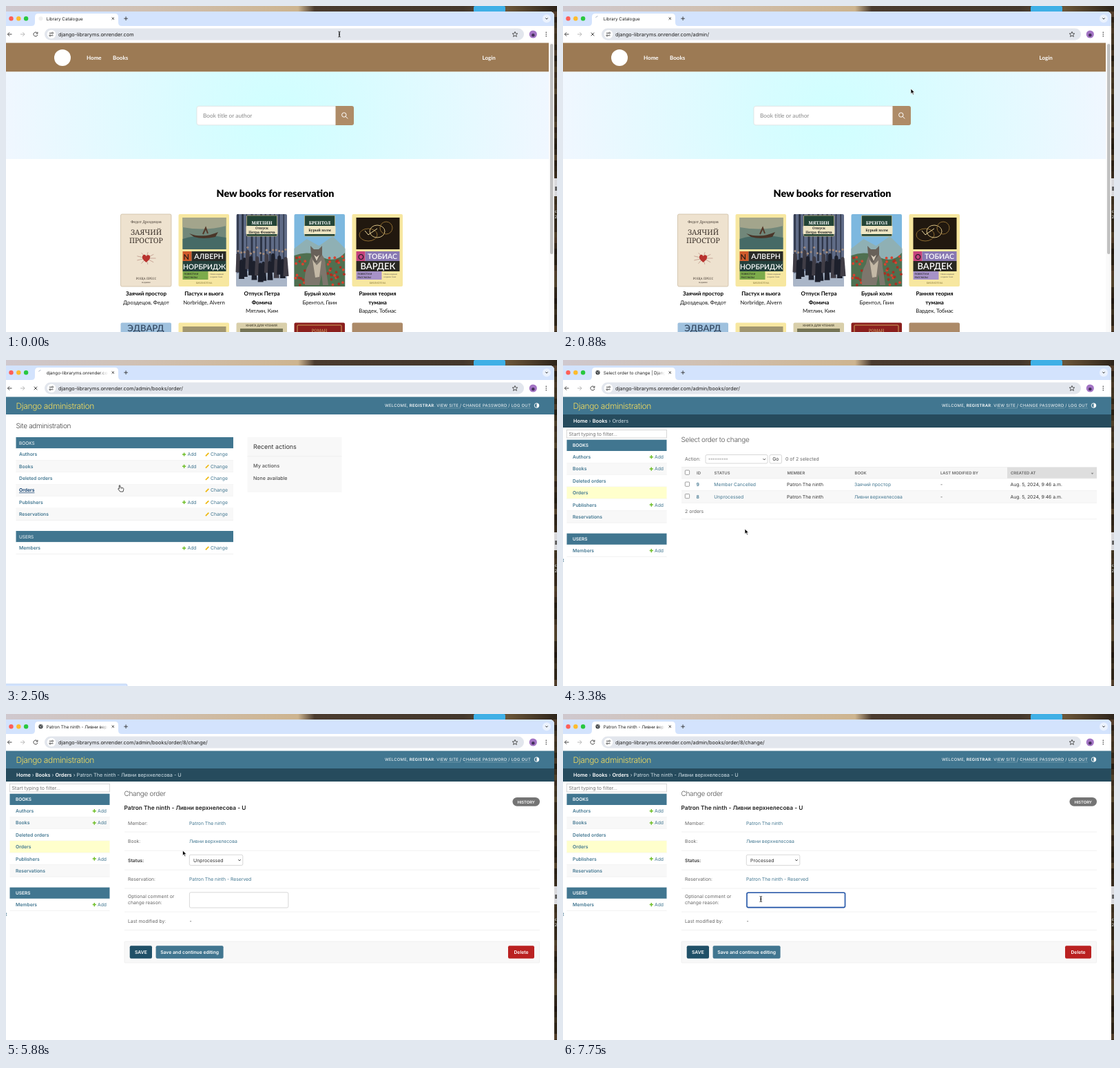
Animation of 800x473 px, one loop 8 s. Source, as an HTML page:

```html
<!DOCTYPE html>
<html lang="en">
<meta charset="utf-8">
<title>Library Catalogue</title>
<style>
html, body { margin: 0; width: 100%; height: 100%; overflow: hidden; background: #fff }
#stage { display: block; width: 800px; height: 473px; font-family: Inter, Roboto, sans-serif; text-rendering: geometricPrecision }
text { white-space: pre }
.site { font-family: Lato, "Open Sans", sans-serif }
.serif { font-family: "Noto Serif", "Liberation Serif", serif }
.light { font-weight: 300; letter-spacing: -.03em }
.b { font-weight: 600 }
#omni .b { font-weight: 700 }
.mid { text-anchor: middle }
.hover { fill: #036; text-decoration: underline }
</style>
<svg id="stage" viewBox="0 0 800 473"></svg>
<script>
const R = (x, y, w, h, fill, r = 0, extra = '') =>
  `<rect x="${x}" y="${y}" width="${w}" height="${h}" fill="${fill}" rx="${r}" ${extra}/>`;
const T = (x, y, s, size = 6.8, fill = '#333', cls = '', id = '') =>
  `<text x="${x}" y="${y}" font-size="${size}" fill="${fill}" class="${cls}" id="${id}">${s}</text>`;
const C = (x, y, r, fill, extra = '') => `<circle cx="${x}" cy="${y}" r="${r}" fill="${fill}" ${extra}/>`;
const P = (d, stroke, width = 1, fill = 'none') =>
  `<path d="${d}" stroke="${stroke}" stroke-width="${width}" fill="${fill}"/>`;
const F = (d, fill) => P(d, 'none', 0, fill);
const G = (id, body, cls = '') => `<g id="${id}" class="${cls}">${body}</g>`;
const line = (x, y, w, c = '#ebebeb') => R(x, y, w, .7, c);
const border = (x, y, w, h, r = 2, c = '#c8c8c8', sw = .7) => R(x, y, w, h, '#fff', r, `stroke="${c}" stroke-width="${sw}"`);
const range = n => [...Array(n).keys()];

const blue = '#417690', ink = '#1f1f1f', grey = '#666';
const host = 'django-libraryms.onrender.com';
const reader = 'Patron The ninth', title = 'Ливни верхнелесова', cancelled = 'Заячий простор';
const order = `${reader} - ${title} - U`;

const globe = (x, y) => C(x, y, 3.1, '#3c4043') + P(`M${x - 2} ${y - 1}l2 1 .5 2M${x + .5} ${y - 2.5}l1.5 2`, '#fff', .7);
const dot = (x, y) => C(x, y, 3, '#f0f0f0');
const lens = (x, y, r = 1.9, c = '#333', w = .9) => C(x, y, r, 'none', `stroke="${c}" stroke-width="${w}"`) + P(`M${x + r * .7} ${y + r * .7}l${r} ${r}`, c, w);
const cross = (x, y, r, w = .9) => P(`M${x - r} ${y - r}l${2 * r} ${2 * r}m0 ${-2 * r}l${-2 * r} ${2 * r}`, '#333', w);
const plus = (x, y) => P(`M${x - 2.6} ${y}h5.2M${x} ${y - 2.6}v5.2`, '#70bf2b', 1.5);
const pencil = (x, y) => P(`M${x - 2.3} ${y + 2.3}l4.4-4.4`, '#efb80b', 1.7);
const chevron = (x, y) => P(`M${x - 1.7} ${y - .8}l1.7 1.7 1.7-1.7`, '#333', 1);

// Desktop behind the window
let seed = 7;
const rnd = () => (seed = seed * 16807 % 2147483647) / 2147483647;
const stops = list => list.map(([o, c]) => `<stop offset="${o}" stop-color="${c}"/>`).join('');
const defs = `<defs>
<linearGradient id="sand">${stops([[0, '#cfc8ce'], [.25, '#d0c0b2'], [.53, '#cdb48f'], [.56, '#4a3b2f'], [.83, '#43372c'], [.91, '#6b5639'], [1, '#2c231a']])}</linearGradient>
<linearGradient id="fade"><stop offset="0" stop-color="#fff" stop-opacity="0"/><stop offset="1" stop-color="#fff"/></linearGradient>
<radialGradient id="hero" gradientUnits="userSpaceOnUse" cx="394" cy="159" r="400">${stops([[0, '#d0ffff'], [.3, '#d8fcff'], [1, '#f0f7ff']])}</radialGradient>
<filter id="shadow" x="-10%" y="-20%" width="120%" height="150%"><feDropShadow dx="0" dy="2" stdDeviation="2.5" flood-opacity=".35"/></filter>
</defs>`;
const desktop = R(0, 0, 800, 473, 'url(#sand)') + R(679, 0, 46, 9, '#3fb0e6', 2) +
  range(60).map(i => R(794, 8 + i * 8, 6, 8, `hsl(${28 + rnd() * 10} 30% ${10 + rnd() * 16}%)`)).join('') +
  R(794, 250, 6, 26, '#d9d9dc') + R(797, 262, 3, 6, '#666') + T(796.5, 300, 'c', 6, '#fff') + T(796.5, 308, '2', 6, '#fff');

// Browser frame
const tabTitle = `<svg width="148" height="30">${T(58.7, 20.6, '', 6.3, ink, '', 'tab')}</svg>`;
const chrome = R(-10, 8, 806, 480, '#fff', 6) + F('M0 29V8H790a6 6 0 0 1 6 6V29Z', '#d3e3fd') +
  ['#ff5f57', '#febc2e', '#28c840'].map((c, i) => C(7.5 + i * 10.8, 18.2, 3.2, c)).join('') +
  F('M37 29q5 0 5-5V16q0-5 5-5H158q5 0 5 5V24q0 5 5 5Z', '#fff') + tabTitle + R(136, 13, 12, 12, 'url(#fade)') +
  G('favBook', dot(50.5, 18.2)) + G('favGlobe', globe(50.5, 18.2)) +
  G('favSpin', P('M47.5 17a3 3 0 0 1 3-2.2', '#a8b4c8', .9)) +
  cross(155.3, 18.2, 1.7) + P('M171.3 18.2h5.6m-2.8-2.8v5.6', '#333', .9) +
  C(785, 18.2, 6, '#ebf2fe') + chevron(785, 18.2) +
  P('M8.5 41H2.5m2.7-2.8L2.4 41l2.8 2.8', '#333', .9) + P('M21 41h6m-2.7-2.8L27.1 41l-2.8 2.8', '#b0b0b0', .9) +
  G('reload', P('M45.4 39.2a3 3 0 1 0 .5 2.6M45.9 37.7v2.4h-2.4', '#333', .9)) + G('stop', cross(43, 41, 2.3)) +
  R(56, 32.5, 696, 17, '#e2e6ed', 8.5) + C(66, 41, 6.3, '#fff') +
  P('M62.9 39.3h3M68.5 42.8h-3', '#333', .9) + C(67.5, 39.3, 1.1, 'none', 'stroke="#333" stroke-width=".8"') +
  C(64, 42.8, 1.1, 'none', 'stroke="#333" stroke-width=".8"') + T(76, 43.6, '', 7.35, ink, '', 'url') +
  P('M739 37.3l1.1 2.5 2.7.2-2.1 1.8.7 2.7-2.4-1.5-2.4 1.5.7-2.7-2.1-1.8 2.7-.2Z', '#333', .8) +
  C(765.3, 41, 5.6, '#a374c4') + C(765.3, 42.3, 2.3, '#45305c') +
  range(3).map(i => C(784.3, 38.2 + i * 2.8, .8, '#333')).join('');

// Library home page
const label = (x, name, lines) =>
  R(x + 15, 304, 44, 30, '#234436', 1, 'stroke="#d6c48a" stroke-width=".7"') + T(x + 37, 316.5, name, 6.5, '#fff', 'mid serif b') +
  R(x + 14, 319, 46, 12, '#efe6c4', 1) + lines.map((s, i) => T(x + 37, 327 + (i - (lines.length - 1) / 2) * 5.4, s, 5, '#222', 'mid serif b')).join('');
const classic = (x, pic, name, surname, size, c1, c2, c3, c4) => R(x, 302, 73.5, 105, '#f7e7a0', 2) + R(x + 6, 307, 63, 46, pic) +
  R(x + 6, 356, 13, 14, c1) + R(x + 19, 356, 50, 14, c2) + R(x + 6, 370, 63, 15, c4) +
  T(x + 44, 367, name, 10.5, '#fff', 'mid b') + T(x + 37.5, 382, surname, size, '#fff', 'mid b') +
  R(x + 6, 385, 37, 12, c3) + T(x + 8, 390, 'ПОВЕСТИ И', 3.6, '#222', 'b') + T(x + 8, 395, 'РАССКАЗЫ', 3.6, '#222', 'b') +
  T(x + 46, 390, 'Новое издание', 2.8, '#555') + T(x + 46, 394, 'в одном томе', 2.8, '#555') + T(x + 37, 403, 'БИБЛИОТЕКА', 3.5, '#8a7a40', 'mid');
const hare = R(166.5, 302, 73.5, 105, '#eee2cf', 2, 'stroke="#c9b89c" stroke-width=".7"') + T(203.5, 315, 'Федот Дроздецов', 5.2, '#443a32', 'mid serif') +
  T(203.5, 332, 'ЗАЯЧИЙ', 10.5, '#3a3029', 'mid serif') + T(203.5, 343.5, 'ПРОСТОР', 10.5, '#3a3029', 'mid serif') +
  range(9).map(i => P(`M203.5 366l${14 * Math.cos(i * .7)} ${9 * Math.sin(i * .7)}`, '#a0675c', .5)).join('') +
  F('M203.5 372q-9-7-4-11 3-1 4 2 2-3 5-1 3 4-5 10Z', '#b8322e') +
  T(203.5, 397, 'РОЩА ПРЕСС', 4.5, '#443a32', 'mid serif') + T(203.5, 401.5, 'издание', 3, '#443a32', 'mid serif');
const sea = classic(250.5, '#71877a', 'АЛВЕРН', 'НОРБРИДЖ', 10.3, '#cf5a2b', '#2a2b28', '#7cab4b', '#24403c') +
  F('M256.5 307h63v12q-30 8-63 2Z', '#a3a58c') + F('M256.5 338q28-9 63-2v17h-63Z', '#466a66') +
  F('M266 330q19 8 42-2l-4 7q-18 4-31 0Z', '#4a3528') + P('M286 331l4-9 3 8', '#55392a', 2) + T(257.6, 367.5, 'N', 11, '#241c18', 'b');
const forest = R(334.5, 302, 73.5, 105, '#5f6b86', 2) + range(11).map(i => R(335.5 + i * 6.7, 302, 1 + rnd() * 2, 68, '#2c3345')).join('') +
  F('M334.5 388q35-10 73.5 2v17h-73.5Z', '#aab6c8') +
  range(16).map(i => {
    const x = 337 + i * 4.6, y = 350 + rnd() * 10;
    return F(`M${x - 3.5} ${y + 30 + rnd() * 12}l1-26q2.5-4 5 0l2 26Z`, i % 3 ? '#1d202c' : '#403d46') + C(x, y, 1.6, '#a08a7c');
  }).join('') + label(334.5, 'МЯТЛИН', ['Отпуск', 'Петра Фомича']);
const wolf = R(418.5, 302, 73.5, 105, '#7db8df', 2) + F('M418.5 352l18-14 18 10 20-14 18 18v55h-73.5Z', '#8fb0b4') +
  F('M418.5 362q20-8 40 2t33.5-6v49h-73.5Z', '#4f7050') +
  range(40).map(i => C(i % 3 ? 467 + rnd() * 24 : 420 + rnd() * 15, 362 + rnd() * 43, 1.9, i % 2 ? '#d8432f' : '#aa3022')).join('') +
  F('M434 405q-2-20 6-31 2-12 8-16h8q9 8 8 20l4 27h-8l-2-16-3 16Z', '#7d766c') + F('M445 368l6 8 7-7-3 24-6 1Z', '#c4b9a6') +
  F('M443 362l-1-14 5 5h7l5-5 0 13-5 6-3 5h-3Z', '#686159') + F('M447 361l4 9 4-9-4 3Z', '#d8cebc') + label(418.5, 'БРЕНТОЛ', ['Бурый холм']);
const clock = classic(502.5, '#21180f', 'ТОБИАС', 'ВАРДЕК', 13, '#c4427d', '#8878b2', '#a792c8', '#282722') + T(511, 367.5, 'О', 11, '#251c2b', 'b') +
  range(3).map(i => `<ellipse cx="${526 + i * 13}" cy="${332 - i * 5}" rx="${13 - i * 2}" ry="9" fill="none" stroke="${i % 2 ? '#d9c083' : '#8d6b30'}"/>`).join('') +
  P('M526 332l13-9m-13 9l-5-6', '#eedba0', 1);
const shelf = R(166.5, 459.5, 73.5, 20, '#9fc1de', 2) + T(203, 472, 'ЭДВАРД', 13, '#354a63', 'mid b') +
  R(250.5, 459.5, 73.5, 20, '#f7e7a0', 2) + R(256.5, 465, 63, 10, '#a19670') +
  R(334.5, 459.5, 73.5, 20, '#d9cfaa', 2) + T(371, 465, 'КНИГА ДЛЯ ЧТЕНИЯ', 4.5, '#44402f', 'mid b') + R(340, 468, 62, 8, '#757456') +
  R(418.5, 459.5, 73.5, 20, '#8b1f1d', 2) + R(423, 463, 64, 20, 'none', 1, 'stroke="#cfa35b"') + T(455, 473, 'РОМАН', 6, '#d8b571', 'mid serif') +
  R(502.5, 459.5, 73.5, 20, '#ac8a68', 2);
const captions = [[cancelled, '', 'Дроздецов, Федот'], ['Пастух и вьюга', '', 'Norbridge, Alvern'], ['Отпуск Петра', 'Фомича', 'Мятлин, Ким'],
  ['Бурый холм', '', 'Брентол, Гвин'], ['Ранняя теория', 'тумана', 'Вардек, Тобиас']].map(([a, b, who], i) => {
  const x = 203.5 + i * 84;
  return `<g font-weight="700">${T(x, 420, a, 8, '#000', 'mid') + T(x, 432.5, b, 8, '#000', 'mid')}</g>` + T(x, b ? 445 : 432.5, who, 7.8, '#111', 'mid');
}).join('');
const home = R(0, 53, 796, 420, '#fff') + R(0, 53.5, 788, 42, '#9c7a54') + C(82, 75, 12, '#fff') +
  `<g font-weight="700">${T(117, 77.5, 'Home', 8, '#fff') + T(155, 77.5, 'Books', 8, '#fff') + T(691.5, 77.5, 'Login', 8, '#fff')}</g>` +
  R(0, 95.5, 788, 126.5, 'url(#hero)') + border(277, 145.3, 204, 27.5, 3, '#dcdcdc') + T(286, 162, 'Book title or author', 8.3, '#888') +
  F('M478.5 145h23.5a3 3 0 0 1 3 3v22a3 3 0 0 1-3 3h-23.5Z', '#ae8b67') + lens(490.8, 158, 3.2, '#fff', 1) +
  `<g font-weight="900">${T(391, 276.5, 'New books for reservation', 14.3, '#000', 'mid')}</g>` +
  hare + sea + forest + wolf + clock + shelf + captions + R(788, 53, 8, 420, '#fafafa') + R(790, 55, 4.5, 305, '#c1c1c1', 2.2);

// Address suggestions
const strong = s => `<tspan class="b">${s}</tspan>`;
const link = path => ` - <tspan fill="#1b4bb5">${strong('https://' + host + (path ? '/' : ''))}${path}</tspan>`;
const hits = [[dot, 'Library Catalogue' + link('')], [globe, `Log in | ${strong('Django')} site admin` + link('admin')],
  [lens, `https://${host}/ <tspan fill="#555">- Quorla Search</tspan>`], [globe, `Site administration | ${strong('Django')} site admin` + link('admin/')],
  [dot, 'Library Catalogue' + link('login')], [dot, 'Library Catalogue' + link('books')]];
const omni = R(54, 30, 701, 153, '#fff', 8, 'filter="url(#shadow)"') + dot(69, 41) +
  T(83, 43.6, `https://${host}/`, 7.3, ink) + R(219.5, 37, .7, 8, '#000') +
  F('M54 53H736a10 10 0 0 1 0 20H54Z', '#f1f1f2') + R(54, 53, 2, 20, '#0b57d0') + cross(731.5, 63, 2.3) +
  hits.map(([icon, s], i) => icon(69, 63 + i * 21) + T(83, 65.6 + i * 21, s, 7.38, ink)).join('');

// Django admin
const links = [['Authors', 1], ['Books', 1], ['Deleted orders'], ['Orders'], ['Publishers', 1], ['Reservations']];
const admin = R(0, 53, 796, 420, '#fff') + R(0, 53.5, 796, 25.5, blue) + T(14.5, 71, 'Django administration', 12, '#f5dd5d', 'light') +
  `<g text-anchor="end" letter-spacing=".27">${T(762, 68, `WELCOME, ${strong('REGISTRAR')}. VIEW SITE / CHANGE PASSWORD / LOG OUT`, 5.9, '#fff')}</g>` +
  [[630, 30], [666, 62], [734, 28]].map(([x, w]) => line(x, 69.5, w, '#7fa3b5')).join('') +
  C(770.5, 66, 3.3, 'none', 'stroke="#fff" stroke-width=".9"') + F('M770.5 62.7a3.3 3.3 0 0 1 0 6.6Z', '#fff');

const module = (x, y, w, name, rows, side) => R(x, y, w, 16.3, blue) + T(side ? 14 : 19, y + 10.5, name, 6.5, '#fff', side ? 'b' : '') +
  rows.map(([s, add], i) => {
    const cy = y + 25 + i * 17.35, current = side && s == 'Orders';
    return R(x, cy - 8.7, w, 17.35, current ? '#ffffcc' : i % 2 ? '#f8f8f8' : '#fff') + line(x, cy + 8.3, w) +
      T(side ? 14 : 19, cy + 2.4, s, 6.8, blue, 'b', !side && s == 'Orders' ? 'orders' : '') +
      (add ? plus(side ? 128.3 : 258.6, cy) + T(side ? 133 : 263.5, cy + 2.4, 'Add', 6.8, blue) : '') +
      (side ? '' : pencil(292.2, cy) + T(297, cy + 2.4, 'Change', 6.8, blue));
  }).join('');
const site = T(14.5, 99.3, 'Site administration', 10, '#444', 'light') +
  module(14.5, 112, 315.5, 'BOOKS', links) + module(14.5, 248, 315.5, 'USERS', [['Members', 1]]) +
  R(350.5, 112, 137, 80, '#f8f8f8') + T(359, 129, 'Recent actions', 9, '#333') + line(350.5, 139.5, 137) +
  T(359, 156, 'My actions', 7.2, grey, 'b') + T(359, 174, 'None available', 7.1);
const side = R(0, 79, 796, 19, '#264b5d') + border(5.5, 101.5, 145, 11.5, 0) + T(8.5, 109.7, 'Start typing to filter…', 7.1, '#757575') +
  module(5.5, 115.7, 145, 'BOOKS', links, true) + module(5.5, 251.6, 145, 'USERS', [['Members', 1]], true) + T(-.8, 293, 't', 7, blue);
const crumbs = (parents, last) => T(15, 91.3, parents.map(s => `<tspan class="b" fill="#fff">${s}</tspan> › `).join('') + last, 7.3, '#d3e2ea');

const box = y => border(177.3, y, 6.3, 6.3, 1, '#777');
const row = (y, id, status, book, key) => box(y - 4) + T(193.5, y + 2.4, id, 6.8, blue, 'b') + T(219.3, y + 2.4, status, 6.8, blue, '', key) +
  T(325, y + 2.4, reader) + T(423, y + 2.4, book, 6.8, blue) + T(548, y + 2.4, '-') + T(649.5, y + 2.4, 'Aug. 5, 2024, 9:46 a.m.');
const list = crumbs(['Home', 'Books'], 'Orders') + T(171.5, 119, 'Select order to change', 10, '#555', 'light') +
  T(177, 146, 'Action:', 6.9, grey) + border(207, 137.5, 90, 12.5) + T(211, 146, '---------', 6.9) + chevron(292.3, 144) +
  border(300, 137.5, 17.5, 12.5) + T(308.8, 146.2, 'Go', 6.8, '#333', 'mid') + T(323, 146, '0 of 2 selected', 6.9, grey) +
  R(172, 155.5, 603, 16.3, '#f6f6f6') + R(645, 155.5, 130, 16.3, '#dedede') + line(172, 155.3, 603) + line(172, 171.6, 603) + box(160) +
  [['ID', 194], ['STATUS', 219.5], ['MEMBER', 325.5], ['BOOK', 423.5], ['LAST MODIFIED BY', 548], ['CREATED AT', 650]]
    .map(([s, x]) => T(x, 166, s, 5.9, grey, 'b')).join('') + F('M766.5 163.7h4l-2 2.4Z', '#888') +
  R(172, 189.7, 603, 17.3, '#f8f8f8') + line(172, 189.4, 603) + line(172, 206.8, 603) +
  row(181, 9, 'Member Cancelled', cancelled) + row(198.4, 8, 'Unprocessed', title, 'pending') + T(177, 221.5, '2 orders', 6.9, grey) + line(172, 230.5, 603);

const button = (x, y, w, h, fill, s) => R(x, y, w, h, fill, 2) + T(x + w / 2, y + h / 2 + 2.4, s, 6.8, '#fff', 'mid b');
const form = crumbs(['Home', 'Books', 'Orders'], order) + T(171.5, 119, 'Change order', 10, '#555', 'light') +
  T(171.5, 139, order, 8.4, '#222', 'b') + R(735.5, 121, 39.5, 12.7, '#747474', 6.4) + T(755.2, 129.5, 'HISTORY', 5.8, '#fff', 'mid b') +
  [['Member:', 160.5], ['Book:', 187.3], ['Reservation:', 242], ['Optional comment or', 267], ['change reason:', 276], ['Last modified by:', 302.8]]
    .map(([s, y]) => T(177, y, s, 6.8, grey)).join('') + T(177, 214.8, 'Status:', 6.8, '#333', 'b') +
  [170.7, 197.8, 225.8, 252.7, 286.7, 313.2].map(y => line(172, y, 603)).join('') +
  T(266, 160.5, reader, 6.8, blue) + T(266, 187.3, title, 6.8, blue) + border(266.3, 204.3, 77.5, 15.3) +
  T(272, 214.5, '', 6.9, '#333', '', 'status') + chevron(339, 212) + T(266, 242, reader + ' - Reserved', 6.8, blue) +
  border(266.4, 258.8, 143.5, 22.3) + G('focus', border(267, 259.3, 142.5, 21.3, 2, '#2457ab', 1.6)) + G('caret', R(269.6, 266, .8, 9, '#000')) +
  T(266.5, 302.8, '-') + R(172, 330, 602.5, 31, '#f8f8f8', 1, 'stroke="#ebebeb" stroke-width=".7"') +
  button(179.7, 336.2, 32.3, 18.5, '#205067', 'SAVE') + button(217.6, 336.2, 98, 18.5, blue, 'Save and continue editing') +
  button(729, 336.2, 38, 18.5, '#ba2121', 'Delete') +
  G('popup', R(262, 203.5, 81.5, 63, '#ebebeb', 4, 'filter="url(#shadow)"') + P('M267.3 212l1.6 2.2 3-4.6', '#222', 1) +
    ['Unprocessed', 'Refused', 'In Queue', 'Member Cancelled', 'Processed'].map((s, i) => T(274.7, 214.7 + i * 11.55, s, 6.9, '#222')).join(''));

const cursors = G('cursor', G('arrow', P('M0 0V7.4l1.8-1.6 1.3 3 1.3-.6-1.3-2.8h2.4Z', '#fff', .7, '#000')) +
  G('hand', P('M-.7 0q1-.8 1.5.2v2.6l4 .8q1.2.4 1 2l-.8 3.4H.7L-2 5.6q-.5-1.2.6-1.1l.7.6Z', '#222', .8, '#fff') + P('M1.8 4v1.3M3.4 4.2v1.2', '#222', .5)) +
  G('beam', P('M-1.7-4q1.7 0 1.7 1V3q0 1-1.7 1M1.7-4Q0-4 0-3V3q0 1 1.7 1M-1 0h2', '#111', .8)));
const bubble = G('bubble', R(-5, 470, 5, 9, '#d3e3fd', 2, 'id="hint" stroke="#aec6ec" stroke-width=".6"'));
document.getElementById('stage').innerHTML = defs + desktop + chrome + G('home', home, 'site') + G('omni', omni) +
  G('admin', admin + G('site', site) + G('side', side) + G('list', list) + G('form', form)) + bubble + cursors;

const $ = id => document.getElementById(id);
const show = (id, on) => $(id).style.display = on ? '' : 'none';
const say = (id, s) => { if ($(id).textContent != s) $(id).textContent = s; };
const latest = (list, t) => list.filter(k => k[0] <= t).pop();

// time, x, y
const path = [[0, 484, 41], [125, 484, 41], [500, 518.7, 40.3], [750, 506, 122], [875, 505, 120], [1000, 501.7, 93.7], [1750, 165, 182], [3000, 165, 182],
  [3375, 264, 245], [4125, 264, 245], [4500, 256.5, 198], [5875, 256.5, 198], [6125, 287, 211], [6250, 287, 211], [6625, 287.3, 255.3], [6750, 287.3, 257], [7000, 287.3, 268.5], [8000, 287.3, 268.5]];
const pointers = [[0, 'beam'], [250, 'arrow'], [1625, 'hand'], [2875, 'arrow'], [4375, 'hand'], [5250, 'arrow'], [6875, 'beam']];
const urls = [[0, ''], [875, '/admin/'], [2375, '/admin/books/order/'], [5125, '/admin/books/order/8/change/']];
const tabs = [[0, 'Library Catalogue'], [1000, 'Site administration | Django site'], [2375, host], [2875, 'Select order to change | Django'], [5250, order]];
const hints = [[0, 0], [1000, 261], [1375, 0], [1625, 176], [2875, 0], [4375, 205], [5250, 0]];

function draw(now) {
  const t = Math.floor(now % 8000 / 125 + .001) * 125;
  const during = (a, b = 8000) => t >= a && t < b;
  const loading = during(875, 1000) || during(2375, 2875) || during(4875, 5250);
  show('home', during(0, 1000));
  show('omni', during(250, 875));
  show('admin', during(1000));
  show('site', during(1000, 2875));
  show('side', during(2875));
  show('list', during(2875, 5250));
  show('form', during(5250));
  show('popup', during(6250, 6750));
  show('focus', during(7125));
  show('caret', during(7500, 7750));
  show('reload', !loading);
  show('stop', loading);
  show('favBook', during(0, 875));
  show('favSpin', loading);
  show('favGlobe', during(1000) && !loading);
  say('tab', latest(tabs, t)[1]);
  say('url', host + latest(urls, t)[1]);
  say('status', t < 6750 ? 'Unprocessed' : 'Processed');
  $('orders').classList.toggle('hover', during(1625, 2875));
  $('pending').classList.toggle('hover', during(4375, 5250));
  const hint = latest(hints, t)[1];
  show('bubble', hint);
  $('hint').setAttribute('width', hint + 5);

  const i = Math.max(1, path.findIndex(k => k[0] > t)), [t0, x0, y0] = path[i - 1], [t1, x1, y1] = path[i];
  const u = (t - t0) / (t1 - t0), e = u * u * (3 - 2 * u);
  $('cursor').setAttribute('transform', `translate(${x0 + (x1 - x0) * e} ${y0 + (y1 - y0) * e})`);
  const pointer = latest(pointers, t)[1];
  for (const id of ['arrow', 'hand', 'beam']) show(id, id == pointer);
}
const start = performance.now();
(function tick() {
  draw(performance.now() - start);
  requestAnimationFrame(tick);
})();
</script>
</html>
```
